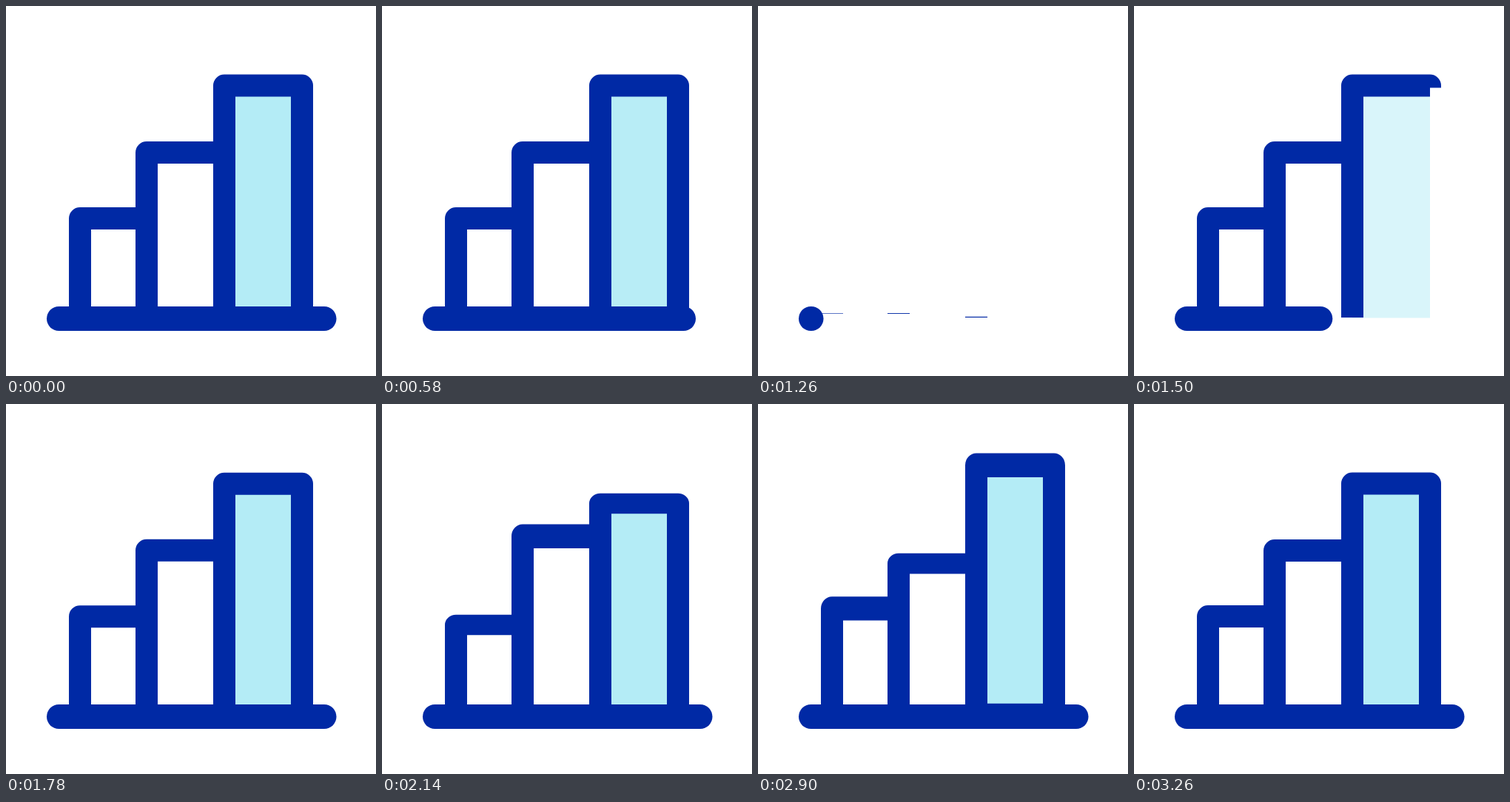
Animation, 500 px wide and 500 px high, one loop 4000 ms. Source, as an HTML page:

```html
<!DOCTYPE html>
<html lang="en">
<head>
<meta charset="utf-8">
<title>Growing bars</title>
<style>
  html, body { margin: 0; width: 100%; height: 100%; overflow: hidden; background: #fff; }
  svg { display: block; width: 100vw; height: 100vh; }
</style>
</head>
<body>
<svg viewBox="0 0 500 500" fill="none" stroke="#0029a5" stroke-width="30" stroke-linejoin="round">
  <g class="bar"><path d="M100 416V287H190V416"/></g>
  <g class="bar"><path d="M190 416V198H295V416"/></g>
  <g class="bar">
    <rect id="fill" x="295" y="107.5" width="105" height="314" fill="#b4ecf6" stroke="none"/>
    <path d="M295 421V107.5H400V421Z"/>
  </g>
  <line id="base" x1="71.5" y1="422.5" x2="430" y2="422.5" stroke-width="33" stroke-linecap="round"/>
</svg>
<script>
const LOOP = 4000;
const FLOOR = 421;
const BASE_START = 71.5;
const BASE_LENGTH = 358.5;

// Each list holds [time, value] keys, eased between neighbours.
const DRAWN = [[505, 1], [1003, 0], [1250, 0], [1750, 1]];
const SWAY = [[1750, 0], [2260, -0.1], [2750, 0.1], [3260, 0]];

const fill = document.getElementById('fill');
const base = document.getElementById('base');
const lengths = [446, 654, 838];
const bars = [...document.querySelectorAll('.bar')].map((group, i) => ({
  group,
  path: group.querySelector('path'),
  length: lengths[i],
  direction: i === 1 ? -1 : 1
}));

const ease = u => u * u * (3 - 2 * u);

function valueAt(keys, time) {
  if (time <= keys[0][0]) return keys[0][1];
  for (let i = 1; i < keys.length; i++) {
    const [t0, v0] = keys[i - 1];
    const [t1, v1] = keys[i];
    if (time < t1) return v0 + (v1 - v0) * ease((time - t0) / (t1 - t0));
  }
  return keys[keys.length - 1][1];
}

function render(time) {
  const drawn = valueAt(DRAWN, time);
  const sway = valueAt(SWAY, time);
  const visibility = drawn > 0 ? 'visible' : 'hidden';

  for (const { group, path, length, direction } of bars) {
    const scale = 1 + direction * sway;
    group.setAttribute('transform', `translate(0 ${FLOOR * (1 - scale)}) scale(1 ${scale})`);
    path.setAttribute('stroke-dasharray', drawn < 1 ? `${length * drawn} 2000` : 'none');
    path.setAttribute('visibility', visibility);
  }
  fill.setAttribute('opacity', drawn);
  base.setAttribute('x2', BASE_START + BASE_LENGTH * drawn);
  base.setAttribute('visibility', visibility);
}

const start = performance.now();
function tick() {
  render((performance.now() - start) % LOOP);
  requestAnimationFrame(tick);
}
tick();
</script>
</body>
</html>
```
